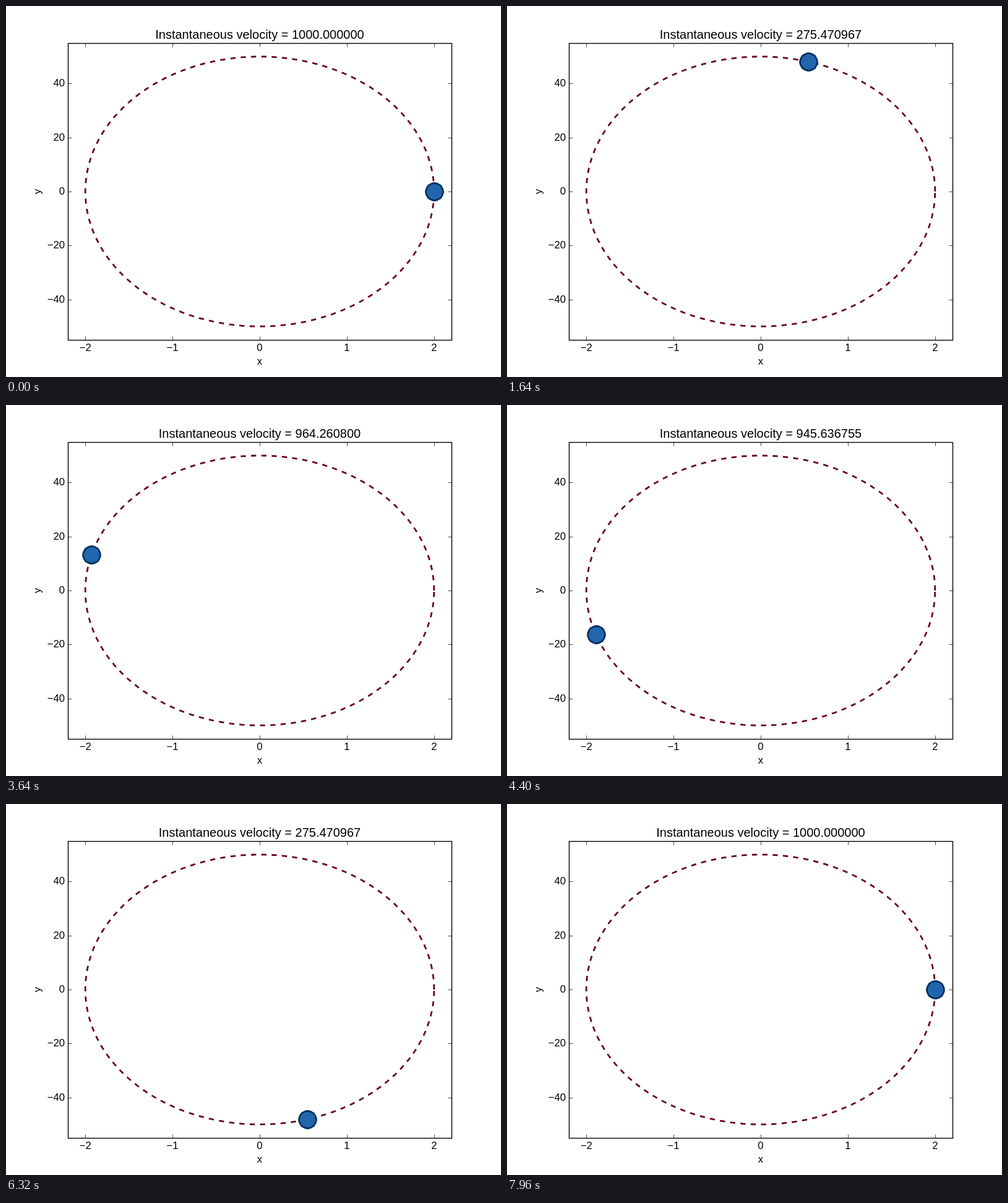
Write an HTML page that moves like this. It is 800x600 px and loops after 8 s.

```html
<!DOCTYPE html>
<html lang="en">
<head>
<meta charset="utf-8">
<title>Velocity on an ellipse</title>
<style>
  html, body { margin: 0; width: 100%; height: 100%; overflow: hidden; background: #fff; }
  svg { display: block; }
  text { font: 16.667px "Liberation Sans", Arial, sans-serif; text-anchor: middle; }
  #title { font-size: 20px; }
  #yLabels text { text-anchor: end; }
  #ticks { stroke: #000; stroke-width: 0.7; }
  #frame { fill: none; stroke: #000; stroke-width: 1.39; }
  #orbit { fill: none; stroke: #67001f; stroke-width: 2.778; stroke-dasharray: 8.333; }
  #ball { fill: #2166ac; stroke: #053061; stroke-width: 2.778; stroke-linejoin: round; }
</style>
</head>
<body>
<svg width="800" height="600" viewBox="0 0 800 600">
  <path id="orbit"/>
  <path id="ball"/>
  <path id="ticks"/>
  <rect id="frame" x="100.5" y="60.5" width="620" height="480"/>
  <g id="xLabels"></g>
  <g id="yLabels"></g>
  <text x="410" y="580">x</text>
  <text transform="translate(56 300) rotate(-90)">y</text>
  <text id="title" x="410" y="53"></text>
</svg>
<script>
const STEPS = 200, STEP_MS = 40;
const A = 2, B = 50, RATE = 20;

const $ = id => document.getElementById(id);
const px = x => 410 + x * 620 / 4.4;
const py = y => 300 - y * 480 / 110;
const snap = v => Math.floor(v + 0.5) + 0.5;
const angle = i => 2 * Math.PI * i / (STEPS - 1);

function addLabel(group, value, x, y) {
  const label = document.createElementNS("http://www.w3.org/2000/svg", "text");
  label.setAttribute("x", x);
  label.setAttribute("y", y);
  label.textContent = String(value).replace("-", "\u2212");
  $(group).append(label);
}

function drawAxes() {
  let d = "";
  for (const v of [-2, -1, 0, 1, 2]) {
    const x = snap(px(v));
    d += `M${x} 540.5v-6M${x} 60.5v6`;
    addLabel("xLabels", v, px(v), 558);
  }
  for (const v of [-40, -20, 0, 20, 40]) {
    const y = snap(py(v));
    d += `M100.5 ${y}h6M720.5 ${y}h-6`;
    addLabel("yLabels", v, 95, Math.round(py(v)) + 5);
  }
  $("ticks").setAttribute("d", d);
}

function drawOrbit() {
  const points = Array.from({ length: STEPS }, (_, i) =>
    `${px(A * Math.cos(angle(i))).toFixed(3)} ${py(B * Math.sin(angle(i))).toFixed(3)}`);
  $("orbit").setAttribute("d", "M" + points.join("L"));
}

// A circle whose control points sit on whole pixels, built by quarter turns.
function shapeBall() {
  let quarter = [[4, -14], [7, -12], [10, -10], [12, -7], [14, -4], [14, 0]];
  let d = "M0 -14";
  for (let k = 0; k < 4; k++) {
    d += "C" + quarter.join(" ");
    quarter = quarter.map(([x, y]) => [-y, x]);
  }
  $("ball").setAttribute("d", d + "Z");
}

function show(i) {
  const c = Math.cos(angle(i)), s = Math.sin(angle(i));
  const speed = RATE * Math.hypot(A * s, B * c);
  $("ball").setAttribute("transform", `translate(${snap(px(A * c))} ${snap(py(B * s))})`);
  $("title").textContent = `Instantaneous velocity = ${speed.toFixed(6)}`;
}

drawAxes();
drawOrbit();
shapeBall();

const start = performance.now();
function tick() {
  show(Math.floor((performance.now() - start) / STEP_MS) % STEPS);
  requestAnimationFrame(tick);
}
tick();
</script>
</body>
</html>
```
